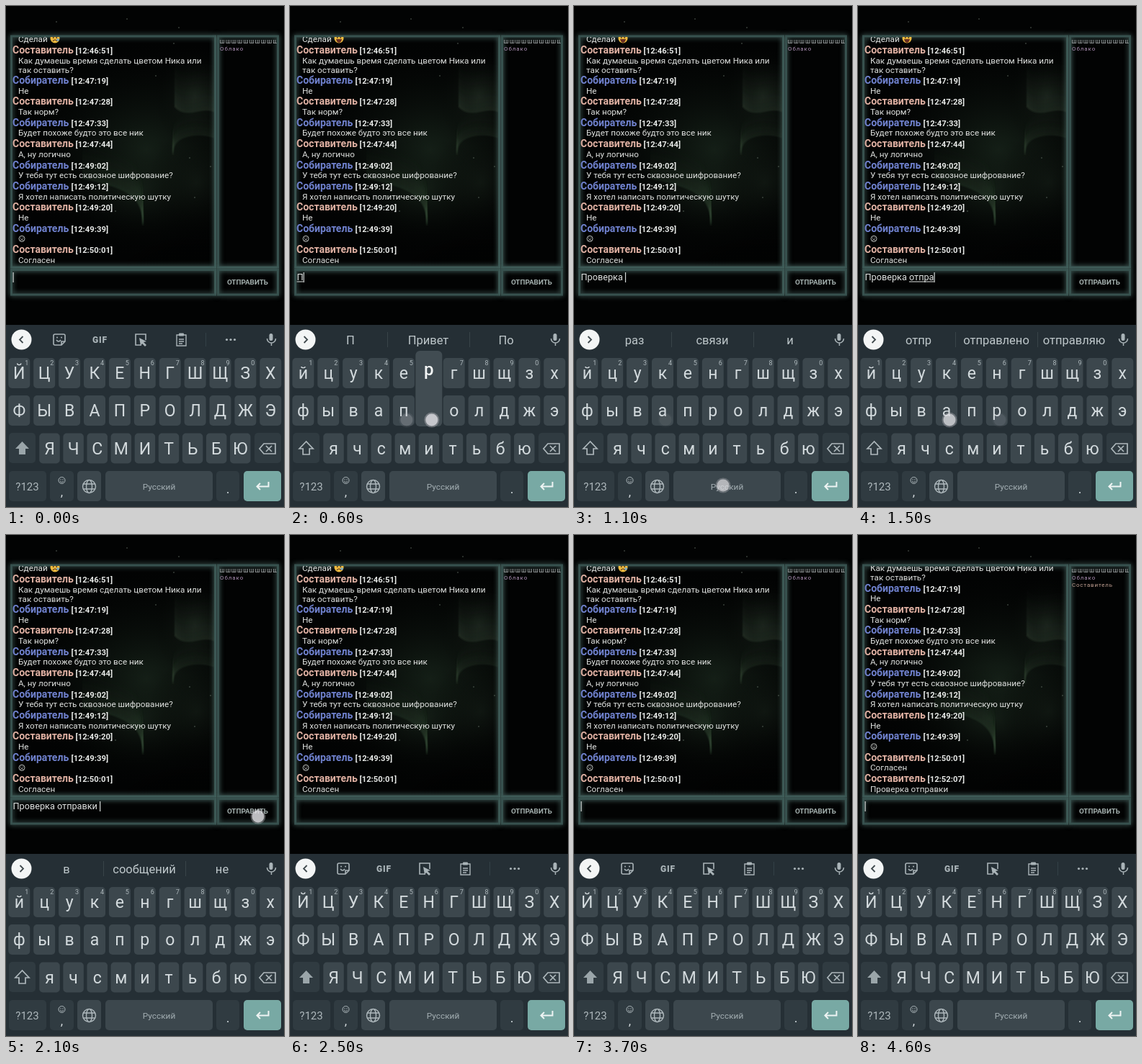
These frames come from a looping animation (386 px wide and 696 px high, 4.9 s). An HTML page with a canvas:

```html
<!DOCTYPE html>
<html lang="ru">
<head>
<meta charset="utf-8">
<style>
html, body { margin: 0; width: 100%; height: 100%; overflow: hidden; background: #000; }
canvas { display: block; }
</style>
</head>
<body>
<canvas id="stage" width="386" height="696"></canvas>
<script>
const ctx = document.getElementById('stage').getContext('2d');
const LOOP = 4900, STEP = 100, HOLD = 60, FADE = 120;
const CLEAR = 2200, ARRIVE = 3900;
const EDITOR = 'Составитель', LEADER = 'Собиратель';

const messages = [
  [EDITOR, '12:46:51', 'Как думаешь время сделать цветом Ника или', 'так оставить?'],
  [LEADER, '12:47:19', 'Не'],
  [EDITOR, '12:47:28', 'Так норм?'],
  [LEADER, '12:47:33', 'Будет похоже будто это все ник'],
  [EDITOR, '12:47:44', 'А, ну логично'],
  [LEADER, '12:49:02', 'У тебя тут есть сквозное шифрование?'],
  [LEADER, '12:49:12', 'Я хотел написать политическую шутку'],
  [EDITOR, '12:49:20', 'Не'],
  [LEADER, '12:49:39', ':('],
  [EDITOR, '12:50:01', 'Согласен'],
  [EDITOR, '12:52:07', 'Проверка отправки']
];

// Suggestions shown once the given number of characters is typed
const suggestions = [
  [1, 'П', 'Привет', 'По'], [2, 'Пр', 'Привет', 'Просто'], [3, 'Про', 'Просто', 'Проверка'],
  [5, 'Прове', 'Проверка', 'Проверить'], [9, 'раз', 'связи', 'и'],
  [10, 'о', 'он', 'от'], [12, 'отп', 'отправил', 'отправить'],
  [14, 'отпр', 'отправлено', 'отправляю'], [15, 'отправ', 'отправить', 'отправки'],
  [18, 'в', 'сообщений', 'не']
];

const typed = 'Проверка отправки ';
const downAt = [450, 560, 660, 730, 790, 840, 885, 930, 1020,
  1150, 1230, 1290, 1335, 1430, 1560, 1650, 1760, 1870];

const keys = [];
function addRow(letters, x, pitch, y, w) {
  [...letters].forEach((ch, i) => keys.push({ ch, x: x + i * pitch, y, w }));
}
addRow('йцукенгшщзх', 18.3, 34.9, 489, 30);
addRow('фывапролджэ', 18.3, 34.9, 541, 30);
addRow('ячсмитьбю', 60.5, 33.1, 593.5, 28.5);

const taps = downAt.map((at, i) => {
  const key = keys.find(k => k.ch === typed[i].toLowerCase());
  return key ? { at, key, x: key.x + 4, y: key.y + 34 } : { at, x: 207, y: 666 };
});
taps.push({ at: 2050, x: 350, y: 391 });

function text(str, x, y, size, color, { weight = 400, align = 'left', spacing = 0 } = {}) {
  ctx.font = `${weight} ${size}px Roboto, "Noto Sans", sans-serif`;
  ctx.textAlign = align;
  ctx.letterSpacing = spacing + 'px';
  ctx.fillStyle = color;
  ctx.fillText(str, x, y);
  return ctx.measureText(str).width;
}
function box(x, y, w, h, r, color) {
  ctx.fillStyle = color;
  ctx.beginPath();
  ctx.roundRect(x, y, w, h, r);
  ctx.fill();
}
function disc(x, y, r, color) {
  ctx.fillStyle = color;
  ctx.beginPath();
  ctx.arc(x, y, r, 0, 7);
  ctx.fill();
}
function ring(x, y, r, color, width = 1) {
  ctx.beginPath();
  ctx.arc(x, y, r, 0, 7);
  ctx.strokeStyle = color;
  ctx.lineWidth = width;
  ctx.stroke();
}
function line(path, color, width = 1.5) {
  ctx.strokeStyle = color;
  ctx.lineWidth = width;
  ctx.stroke(new Path2D(path));
}
function fillPath(path, color) {
  ctx.fillStyle = color;
  ctx.fill(new Path2D(path));
}
function clipped(x, y, w, h, draw) {
  ctx.save();
  ctx.beginPath();
  ctx.rect(x, y, w, h);
  ctx.clip();
  draw();
  ctx.restore();
}
function glow(x, y, rx, ry, color) {
  ctx.save();
  ctx.translate(x, y);
  ctx.scale(rx, ry);
  const g = ctx.createRadialGradient(0, 0, 0, 0, 0, 1);
  g.addColorStop(0, color);
  g.addColorStop(1, 'rgba(0,0,0,0)');
  ctx.fillStyle = g;
  ctx.fillRect(-1, -1, 2, 2);
  ctx.restore();
}

// A lit lower edge whose light fades upwards
function curtain(path, height, color) {
  const p = new Path2D(path);
  ctx.save();
  ctx.lineWidth = 3;
  ctx.strokeStyle = color;
  for (let i = 0; i < height; i += 2) {
    ctx.globalAlpha = 0.13 * (1 - i / height) ** 2;
    ctx.stroke(p);
    ctx.translate(0, -2);
  }
  ctx.restore();
}

function drawBackdrop() {
  ctx.fillStyle = '#020303';
  ctx.fillRect(0, 0, 386, 443);
  clipped(8, 43, 282, 320, () => {
    glow(195, 200, 200, 165, 'rgba(25,38,28,.85)');
    glow(262, 125, 60, 75, 'rgba(46,62,48,.35)');
    glow(185, 255, 110, 75, 'rgba(34,50,37,.4)');
    glow(265, 245, 70, 80, 'rgba(30,42,32,.35)');
    curtain('M234 139 Q243 151 265 146 T296 151', 80, '#56705a');
    curtain('M232 207 Q230 187 251 181 T296 185', 40, '#405a42');
    curtain('M106 239 Q157 249 174 263 T190 305', 60, '#466249');
    glow(270, 375, 140, 65, 'rgba(0,2,1,.8)');
  });
  [[168, 18], [240, 30], [70, 22], [255, 211], [262, 266], [284, 223], [152, 285], [208, 97], [233, 52]]
    .forEach(([x, y]) => disc(x, y, 0.8, '#5c665e'));
}

function drawFrames() {
  ctx.save();
  ctx.shadowColor = '#587a75';
  ctx.shadowBlur = 7;
  ctx.strokeStyle = '#37514e';
  ctx.lineWidth = 3;
  [[7.5, 42, 283, 321], [294.5, 42, 83, 321], [7.5, 366.5, 283, 34.5], [294.5, 366.5, 83, 34.5]]
    .forEach(r => ctx.strokeRect(...r));
  ctx.restore();
}

function drawEmoji(y, happy) {
  disc(68, y, 6.5, '#edba3f');
  disc(65.8, y - 1, 0.9, '#49301c');
  disc(70.2, y - 1, 0.9, '#49301c');
  if (happy) fillPath(`M64 ${y + 1}h8q-1 5-4 5t-4-5`, '#6a3022');
  else {
    line(`M65 ${y + 4}q3-4 6 0`, '#5a3820', 1.2);
    disc(72, y + 2, 1.8, '#75a9c9');
  }
}

function drawSadMark(x, y) {
  ring(x, y, 4, '#d4d8d4', 0.9);
  disc(x - 1.4, y - 1, 0.6, '#ddd');
  disc(x + 1.4, y - 1, 0.6, '#ddd');
  line(`M${x - 2} ${y + 2}q2-2 4 0`, '#ddd', 0.8);
}

function drawChat(t) {
  clipped(9, 43, 280, 319, () => {
    const shift = t >= ARRIVE ? -29.4 : 0;
    text('Сделай', 17, 50 + shift, 11.7, '#e2e4e2');
    drawEmoji(45 + shift, t >= 400 && t < 1900);
    messages.forEach(([name, time, ...lines], i) => {
      if (i === messages.length - 1 && t < ARRIVE) return;
      const y = (i ? 108 + (i - 1) * 29.4 : 66) + shift;
      const editor = name === EDITOR;
      text(name, 9, y, 14, editor ? '#dfb0a2' : '#7082cf', { weight: 700 });
      text(`[${time}]`, editor ? 96.5 : 90.5, y, 11.3, '#e6e8e6', { weight: 700 });
      lines.forEach((str, n) => {
        const base = y + 13.5 + n * 13;
        if (str === ':(') drawSadMark(22, base - 4);
        else text(str, 17, base, 11.7, '#e0e2e0');
      });
    });
  });
  clipped(296, 43, 80, 319, () => {
    text('шшшшшшшшшш', 296.5, 52, 9, '#a9afb0', { spacing: 0.9 });
    text('Облако', 297, 62, 8, '#b092b8', { spacing: 0.9 });
    if (t >= ARRIVE) text(EDITOR, 297, 72, 8, '#c2a092', { spacing: 0.8 });
  });
}

function cursorOn(t) {
  return !(t >= 2400 && t < 2800 || t >= 3200 && t < 3700 || t >= 4100 && t < 4500);
}

function drawInput(t, value) {
  const width = text(value, 9.5, 380.5, 12.7, '#e2e5e4');
  const wordStart = value.lastIndexOf(' ') + 1;
  if (wordStart < value.length) {
    const x = 9.5 + ctx.measureText(value.slice(0, wordStart)).width;
    ctx.fillRect(x, 382.5, 9.5 + width - x, 1);
  }
  if (cursorOn(t)) {
    ctx.fillStyle = '#d5dad9';
    ctx.fillRect(9.5 + width, 370, 1.2, 14);
  }
  text('ОТПРАВИТЬ', 335.5, 387, 9.9, '#a3afad', { weight: 700, align: 'center' });
}

function drawTopBar(count) {
  const ink = '#aab4b8';
  disc(21.5, 463.5, 14, '#f3f5f5');
  line(count ? 'M19.5 459l4.5 4.5-4.5 4.5' : 'M23.5 459l-4.5 4.5 4.5 4.5', '#40494d', 1.8);
  box(365.5, 455, 5, 10, 2.5, ink);
  line('M362.5 462a6 6 0 0 0 12 0M368.5 468v4', ink);
  if (count) {
    const row = suggestions.filter(s => s[0] <= count).pop();
    [84, 192, 300].forEach((x, i) =>
      text(row[i + 1], x, 470, 16.5, '#bec7ca', { align: 'center' }));
    line('M135.5 453v21M249.5 453v21', '#394449', 1);
    return;
  }
  line('M68 456h12q2 0 2 2v8l-5 5h-9q-2 0-2-2v-11q0-2 2-2M82 466h-5v5M70 464q3 4 6 0', ink, 1.6);
  disc(71, 460.5, 1, ink);
  disc(77, 460.5, 1, ink);
  text('GIF', 130.5, 468, 12, ink, { weight: 800, align: 'center', spacing: 0.8 });
  line('M188 471h-8v-15h14v8', ink, 1.6);
  fillPath('M185 461l10 5-4 1 4 4-2 2-4-4-2 3z', ink);
  line('M237 457h13v15h-13zM240 463h7M240 466h7M240 469h5', ink, 1.4);
  box(240, 454.5, 7, 4, 1, ink);
  line('M277.5 454v19', '#344046', 1);
  [306.5, 312, 317.5].forEach(x => disc(x, 463.5, 1.6, ink));
}

function drawKeyboard(t, count) {
  const ink = '#d3dadd', plain = '#3c474d', func = '#303b41', dim = '#aeb8bc';
  const caps = !count;
  const label = ch => caps ? ch.toUpperCase() : ch;
  ctx.fillStyle = '#252f35';
  ctx.fillRect(0, 443, 386, 253);
  drawTopBar(count);
  keys.forEach(({ ch, x, y, w }, i) => {
    box(x - w / 2, y, w, 42, 5, plain);
    text(label(ch), x, y + 29, 23, ink, { align: 'center' });
    if (i < 10) text((i + 1) % 10, x + 10.5, 499, 9, dim, { align: 'center' });
  });

  box(4, 593, 37, 42, 5, func);
  const arrow = 'M22.5 605l-9.5 10h5v8h9v-8h5z';
  if (caps) fillPath(arrow, '#9aa5a9');
  else line(arrow, dim, 1.7);
  box(345, 593, 37, 42, 5, func);
  line('M358 608h16v14h-16l-6-7zM361 611l8 8M369 611l-8 8', dim, 1.7);

  box(4, 646, 52, 42, 5, func);
  text('?123', 29.5, 673, 15, dim, { align: 'center' });
  box(61, 646, 33, 42, 5, func);
  text(',', 77.5, 681, 17, ink, { align: 'center' });
  ring(77.5, 659, 4.5, dim);
  disc(76, 658, 0.7, dim);
  disc(79, 658, 0.7, dim);
  line('M75 660.5q2.5 2.5 5 0', dim, 1);

  box(99, 646, 33, 42, 5, plain);
  line('M106.5 667.5a9 9 0 1 0 18 0a9 9 0 1 0-18 0M111.5 667.5a4 9 0 1 0 8 0a4 9 0 1 0-8 0M107.5 664h16M107.5 671h16', dim, 1.4);
  box(138, 646, 149, 42, 5, plain);
  text('Русский', 212.5, 671.5, 11.8, '#a4afb3', { align: 'center' });
  box(292, 646, 32, 42, 5, func);
  text('.', 308, 677, 18, ink, { align: 'center' });
  box(330, 646, 52, 42, 5, '#78a9a4');
  line('M364.5 661v6.5h-16M353 663l-4.5 4.5 4.5 4.5', '#eef4f3', 2);

  taps.forEach(({ at, key }) => {
    if (!key || t < at || t >= at + HOLD) return;
    box(key.x - 18.5, key.y - 62, 37, 105, 6, '#414c52');
    text(label(key.ch), key.x, key.y - 28, 24, '#f4f6f6', { align: 'center', weight: 500 });
  });
}

function drawTouches(t) {
  taps.forEach(({ at, x, y }) => {
    const age = t - at;
    if (age < 0 || age >= HOLD + FADE) return;
    ctx.save();
    ctx.globalAlpha = age <= HOLD ? 1 : 1 - (age - HOLD) / FADE;
    disc(x, y, 10.5, 'rgba(190,190,194,.4)');
    disc(x, y, 8.5, 'rgba(226,226,230,.75)');
    ctx.restore();
  });
}

function render(now) {
  const t = Math.floor((now % LOOP) / STEP) * STEP;
  const count = t >= CLEAR ? 0 : downAt.filter(at => at + HOLD <= t).length;
  drawBackdrop();
  drawFrames();
  drawChat(t);
  drawInput(t, typed.slice(0, count));
  drawKeyboard(t, count);
  drawTouches(t);
  requestAnimationFrame(render);
}
render(0);
</script>
</body>
</html>
```
